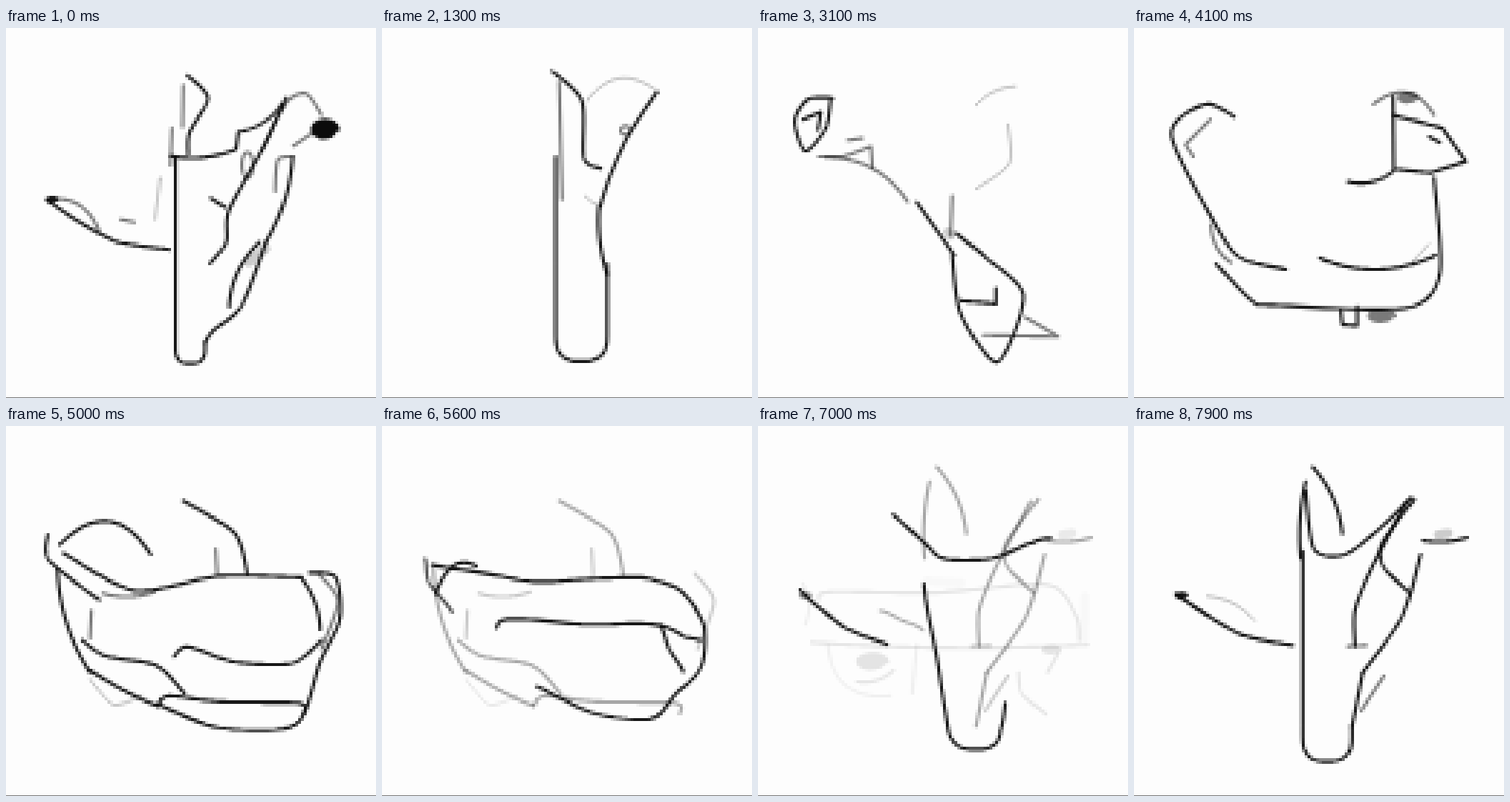
An HTML page with a canvas for the animation above (8 s loop, 518 by 518 pixels).

```html
<!DOCTYPE html>
<html lang="en">
<head>
<meta charset="utf-8">
<title>Morphing sketch</title>
<style>
html, body { margin: 0; width: 100%; height: 100%; overflow: hidden; background: #fdfdfd; }
canvas { display: block; width: 100vw; height: 100vh; }
</style>
</head>
<body>
<canvas id="stage" width="518" height="518"></canvas>
<script>
const SIZE = 518, GRID = 128, LOOP = 8000, STEP = 100, SAMPLES = 60;
const HELD_STEPS = [2, 24, 33, 71];

const clamp = v => Math.max(0, Math.min(1, v));
const mix = (a, b, u) => a + (b - a) * u;
const linear = u => u;
const easeOut = u => 1 - (1 - u) ** 2;

// A shape maps 0..1 to a point. Positive bend lies to the right of the way from start to end.
const arc = (x0, y0, x1, y1, bend = 0) => p => {
  const h = 4 * bend * p * (1 - p);
  return [mix(x0, x1, p) - h * (y1 - y0), mix(y0, y1, p) + h * (x1 - x0)];
};

const join = (...parts) => p => {
  const i = Math.min(parts.length - 1, Math.floor(p * parts.length));
  return parts[i](p * parts.length - i);
};

// Hermite path through points; no tension gives straight edges.
const path = (tension, flat) => p => {
  const last = flat.length / 2 - 1, i = Math.min(last - 1, Math.floor(p * last));
  const f = p * last - i, ease = f * f * (3 - 2 * f);
  return [0, 1].map(axis => {
    const at = k => flat[2 * Math.max(0, Math.min(last, k)) + axis];
    const a = at(i), b = at(i + 1);
    const m = tension * (b - at(i - 1)), n = tension * (at(i + 2) - a);
    return mix(a, b, ease) + f * (1 - f) * ((1 - f) * m - f * n);
  });
};
const curve = (...flat) => path(.4, flat);
const poly = (...flat) => path(0, flat);

const ring = (x, y, rx, ry) => p =>
  [x + rx * Math.cos(2 * Math.PI * p), y + ry * Math.sin(2 * Math.PI * p)];

const scribble = (x, y, rx, ry) => p => ring(x, y, rx * p, ry * p)(p * 4 % 1);

// Upright tube: left wall, rounded bottom, right wall.
const tube = (left, leftTop, right, rightTop, bottom) => {
  const r = (right - left) / 2, rim = bottom - r;
  const end = p => {
    const c = Math.cos(Math.PI * p), s = Math.sin(Math.PI * p);
    return [left + r - r * Math.sign(c) * Math.abs(c) ** .75, rim + r * Math.abs(s) ** .75];
  };
  return join(arc(left, leftTop, left, rim), end, arc(right, rim, right, rightTop));
};

const stroke = (ink, width) => shape => ({
  ink, width, points: Array.from({ length: SAMPLES + 1 }, (_, i) => shape(i / SAMPLES))
});
const dark = stroke(.95, 4.6), soft = stroke(.55, 4.5), faint = stroke(.25, 4);
const bold = stroke(1, 6), smear = stroke(.2, 13);

const birdWithBeak = {
  body: dark(tube(237, 180, 279, 440, 470)),
  flank: dark(curve(279, 440, 290, 424, 330, 388, 364, 300)),
  neck: soft(arc(232, 140, 230, 192)),
  stem: soft(arc(248, 80, 247, 138)),
  crest: dark(curve(254, 66, 283, 98, 257, 146, 255, 176)),
  rim: dark(join(arc(230, 179, 325, 168, .08), arc(325, 145, 392, 98, .12))),
  back: soft(curve(358, 172, 392, 105, 420, 92, 442, 122)),
  beak: bold(scribble(446, 142, 19, 13)),
  throat: soft(arc(427, 148, 402, 165)),
  fold: dark(curve(286, 329, 308, 300, 312, 255, 360, 168, 388, 108)),
  loop: soft(ring(338, 192, 8, 18)),
  chest: dark(arc(401, 180, 364, 300, -.06)),
  collar: soft(curve(377, 228, 381, 185, 401, 180)),
  leaf: dark(arc(312, 390, 355, 300, -.1)),
  tick: dark(arc(287, 238, 307, 251)),
  smudge: smear(arc(340, 328, 364, 309)),
  arm: dark(curve(58, 241, 100, 270, 155, 299, 228, 310)),
  frond: soft(arc(56, 240, 130, 284, -.2)),
  armTip: dark(scribble(64, 240, 7, 3)),
  dash: soft(arc(160, 268, 180, 272)),
  slit: faint(arc(216, 210, 209, 268))
};

const vase = {
  body: dark(tube(243, 180, 315, 330, 467)),
  flank: dark(arc(315, 345, 304, 250, -.05)),
  stem: soft(arc(248, 75, 252, 240)),
  crest: dark(curve(238, 60, 280, 102, 283, 182, 306, 197)),
  fold: dark(curve(305, 250, 318, 210, 345, 150, 385, 90)),
  back: faint(arc(287, 102, 385, 88, -.25)),
  loop: soft(ring(341, 143, 7, 6)),
  chin: faint(arc(285, 235, 305, 247, .1))
};

const pod = {
  body: dark(curve(272, 318, 284, 400, 335, 468, 372, 375, 320, 322, 278, 288)),
  stem: soft(arc(272, 235, 270, 290)),
  smudge: smear(arc(266, 286, 270, 290)),
  tip: dark(curve(105, 98, 70, 100, 51, 130, 66, 172, 95, 140, 102, 100)),
  tipMark: dark(poly(63, 128, 88, 118, 84, 142)),
  tailMark: soft(poly(85, 180, 120, 180, 158, 166, 160, 195)),
  tailDash: soft(arc(126, 157, 146, 154)),
  arm: soft(arc(95, 181, 210, 243, -.13)),
  stalk: dark(arc(222, 244, 275, 318)),
  fold: dark(poly(285, 382, 333, 386, 333, 365)),
  feet: soft(poly(315, 430, 420, 432, 375, 405)),
  back: faint(arc(305, 108, 360, 82, -.1)),
  neck: faint(curve(350, 135, 352, 190, 305, 225))
};

const duck = {
  body: dark(curve(115, 330, 165, 382, 195, 388, 380, 392, 428, 345, 420, 210)),
  arm: dark(curve(140, 124, 100, 107, 52, 150, 120, 285, 150, 322, 213, 338)),
  wing: dark(arc(260, 322, 422, 318, .11)),
  neck: dark(join(arc(363, 95, 364, 200), arc(364, 200, 300, 215, -.12))),
  head: dark(poly(363, 122, 432, 140, 465, 187, 415, 203, 367, 198)),
  cap: soft(arc(335, 107, 420, 122, -.28)),
  capMark: soft(scribble(383, 98, 14, 7)),
  eye: dark(arc(413, 152, 428, 160)),
  feet: dark(poly(290, 395, 292, 415, 312, 417, 312, 390)),
  toes: soft(scribble(346, 403, 20, 9)),
  shade: soft(arc(108, 275, 135, 328, .12)),
  tailMark: soft(poly(107, 128, 72, 163, 83, 180)),
  throat: faint(arc(388, 328, 412, 303))
};

const basket = {
  body: dark(curve(213, 390, 298, 422, 405, 418, 440, 330, 468, 270, 462, 212, 425, 206)),
  side: dark(arc(72, 200, 118, 345, .07)),
  keel: dark(arc(118, 342, 213, 392, .03)),
  shade: faint(curve(118, 355, 150, 390, 190, 378)),
  arm: dark(arc(203, 180, 75, 166, .31)),
  fin: dark(curve(58, 152, 60, 188, 130, 243)),
  finMark: soft(arc(135, 234, 208, 232, .08)),
  rim: dark(curve(80, 178, 180, 230, 300, 210, 414, 212)),
  wing: dark(curve(235, 322, 255, 309, 320, 330, 400, 332, 442, 300)),
  neck: dark(curve(248, 105, 320, 150, 338, 208)),
  fold: dark(curve(107, 300, 140, 322, 210, 335, 250, 375)),
  pad: dark(curve(213, 390, 228, 378, 300, 386, 410, 388, 417, 402)),
  slat: dark(arc(415, 215, 440, 285, -.08)),
  brace: soft(curve(438, 207, 465, 245, 442, 312)),
  stick: soft(arc(294, 172, 296, 208)),
  post: soft(arc(120, 258, 118, 297))
};

const box = {
  body: dark(curve(222, 340, 300, 385, 365, 407, 420, 405, 440, 370, 452, 305)),
  rim: dark(curve(60, 212, 235, 216, 325, 202, 430, 210, 467, 240, 467, 300)),
  arm: dark(arc(60, 212, 75, 303, .12)),
  base: dark(arc(75, 303, 462, 306, .015)),
  wing: dark(curve(85, 243, 100, 232, 250, 233, 405, 222, 445, 265, 450, 300)),
  fin: soft(arc(62, 220, 66, 278, -.12)),
  cup: soft(arc(98, 305, 185, 378, .25)),
  pupil: bold(scribble(159, 330, 22, 11)),
  mouth: dark(arc(138, 358, 190, 342, .12)),
  strut: soft(arc(222, 305, 216, 374)),
  lid: smear(arc(235, 217, 285, 220)),
  slat: dark(curve(365, 345, 370, 375, 403, 403)),
  knob: bold(scribble(410, 313, 12, 4)),
  hook: dark(arc(420, 318, 405, 345)),
  dash: soft(poly(345, 312, 350, 327, 392, 323)),
  gusset: smear(arc(458, 238, 457, 298))
};

const birdWithLeaf = {
  body: dark(tube(236, 175, 305, 420, 470)),
  flank: dark(arc(305, 420, 320, 345)),
  neck: dark(arc(240, 78, 233, 185, .04)),
  crest: dark(arc(250, 57, 292, 150, -.08)),
  rim: dark(curve(240, 90, 252, 172, 295, 180, 350, 138, 388, 101)),
  back: dark(curve(392, 103, 347, 165, 350, 198, 385, 232)),
  fold: dark(curve(309, 308, 309, 258, 332, 200, 382, 106)),
  chest: dark(curve(401, 180, 375, 268, 320, 345)),
  beak: dark(arc(404, 160, 467, 156, .06)),
  smudge: smear(arc(426, 152, 440, 150)),
  leaf: soft(arc(318, 398, 350, 350)),
  feet: soft(arc(300, 308, 325, 307)),
  arm: dark(curve(58, 235, 145, 290, 222, 307)),
  armTip: dark(scribble(66, 237, 8, 3)),
  frond: soft(arc(60, 236, 105, 267)),
  dash: faint(arc(103, 238, 168, 272, -.1))
};

const keys = [
  { time: 0, pose: birdWithBeak, ease: linear },
  { time: 1300, pose: vase, ease: linear },
  { time: 3100, pose: pod, ease: linear },
  { time: 4100, pose: duck, ease: linear },
  { time: 5000, pose: basket, ease: linear },
  { time: 6200, pose: box, ease: easeOut },
  { time: 7900, pose: birdWithLeaf, ease: linear }
];

const stage = document.getElementById('stage').getContext('2d');
const small = document.createElement('canvas');
small.width = small.height = GRID;
const pen = small.getContext('2d');
pen.scale(GRID / SIZE, GRID / SIZE);
pen.lineCap = pen.lineJoin = 'round';

function drawStroke({ width, ink, points }, fade = 1) {
  if (fade <= 0) return;
  pen.lineWidth = width;
  pen.strokeStyle = `rgba(12,12,12,${ink * fade})`;
  pen.beginPath();
  for (const [x, y] of points) pen.lineTo(x, y);
  pen.stroke();
}

const blend = (a, b, u) => ({
  width: mix(a.width, b.width, u),
  ink: mix(a.ink, b.ink, u),
  points: a.points.map(([x, y], i) => [mix(x, b.points[i][0], u), mix(y, b.points[i][1], u)])
});

function draw(time) {
  let step = Math.floor(time / STEP);
  if (HELD_STEPS.includes(step)) step--;
  const now = step * STEP;
  const index = Math.min(keys.length - 2, keys.findLastIndex(key => key.time <= now));
  const from = keys[index], to = keys[index + 1];
  const u = from.ease(clamp((now - from.time) / (to.time - from.time)));

  pen.fillStyle = '#fdfdfd';
  pen.fillRect(0, 0, SIZE, SIZE);
  for (const name of Object.keys({ ...from.pose, ...to.pose })) {
    const a = from.pose[name], b = to.pose[name];
    if (a && b) drawStroke(blend(a, b, u));
    else if (a) drawStroke(a, clamp(1 - u * 1.25));
    else drawStroke(b, clamp(u * 2.2 - 1.2));
  }
  stage.imageSmoothingEnabled = false;
  stage.drawImage(small, 0, 0, SIZE, SIZE);
  stage.fillStyle = '#777';
  stage.fillRect(0, SIZE - 1, SIZE, 1);
}

const start = performance.now();
function tick(now) {
  draw(Math.max(0, now - start) % LOOP);
  requestAnimationFrame(tick);
}
draw(0);
requestAnimationFrame(tick);
</script>
</body>
</html>
```
